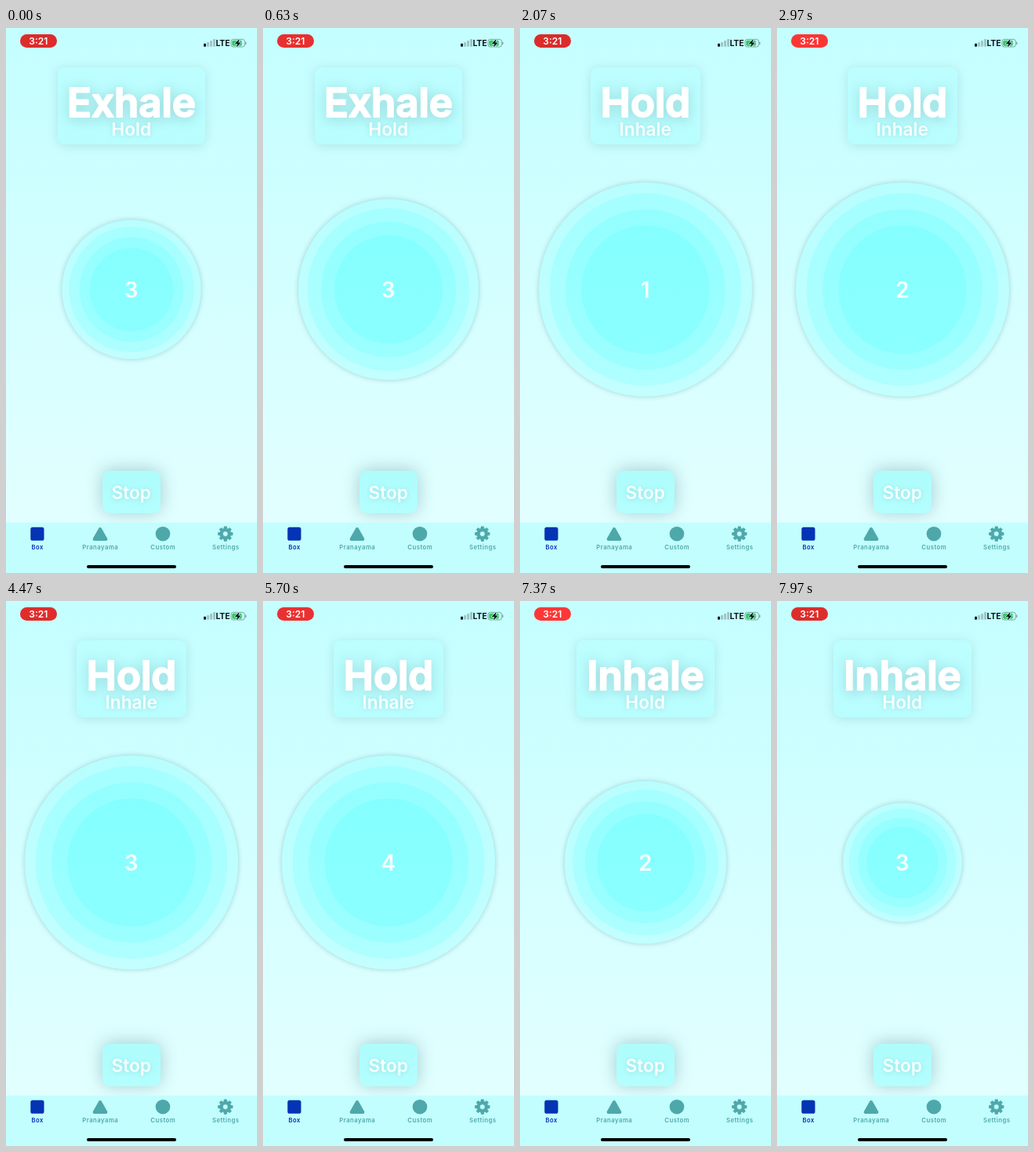
Recreate the animation shown at these times as an HTML page with a canvas. Size 320 by 693 pixels, loop 8 s.

```html
<!DOCTYPE html>
<html lang="en">
<head>
<meta charset="utf-8">
<title>Box breathing</title>
<style>
  html, body { margin: 0; width: 100%; height: 100%; overflow: hidden; background: #d2feff; }
  canvas { display: block; width: 100vw; height: 100vh; }
</style>
</head>
<body>
<canvas id="stage"></canvas>
<script>
const W = 320, H = 693, LOOP = 8000, PHASE = 4000;
const LABEL_START = 1950;   // first phase change of the labels
const MOVE_START = 1850;    // the disc starts slightly ahead of them
const R_MIN = 27, R_MAX = 136;
const TEAL = '#4ea8aa', BLUE = '#0433b4', TAU = Math.PI * 2;

const PHASES = [
  { title: 'Exhale', next: 'Hold', half: 94 },
  { title: 'Hold', next: 'Inhale', half: 70 },
  { title: 'Inhale', next: 'Hold', half: 88 }
];

const canvas = document.getElementById('stage');
const ctx = canvas.getContext('2d');
let scale = 1;

function resize() {
  const dpr = window.devicePixelRatio || 1;
  canvas.width = Math.round(innerWidth * dpr);
  canvas.height = Math.round(innerHeight * dpr);
  scale = canvas.width / W;
}

function shadow(color, blur, dy = 0) {
  ctx.shadowColor = color;
  ctx.shadowBlur = blur * scale;
  ctx.shadowOffsetY = dy * scale;
}

function noShadow() {
  shadow('transparent', 0);
}

function roundRect(x, y, w, h, r, fill) {
  ctx.beginPath();
  ctx.roundRect(x, y, w, h, r);
  ctx.fillStyle = fill;
  ctx.fill();
}

function disc(x, y, r, fill) {
  ctx.beginPath();
  ctx.arc(x, y, r, 0, TAU);
  ctx.fillStyle = fill;
  ctx.fill();
}

function text(str, x, y, size, weight, fill, spacing = 0) {
  ctx.font = `${weight} ${size}px Inter, Roboto, sans-serif`;
  ctx.letterSpacing = spacing + 'px';
  ctx.textAlign = 'center';
  ctx.fillStyle = fill;
  ctx.fillText(str, x + spacing / 2, y);
  ctx.letterSpacing = '0px';
}

function vertical(y0, y1, from, to) {
  const g = ctx.createLinearGradient(0, y0, 0, y1);
  g.addColorStop(0, from);
  g.addColorStop(1, to);
  return g;
}

// Cubic ease-in-out with control points (.42, 0) and (.58, 1)
function ease(u) {
  if (u <= 0) return 0;
  if (u >= 1) return 1;
  let lo = 0, hi = 1, s = .5;
  for (let i = 0; i < 24; i++) {
    s = (lo + hi) / 2;
    const q = 1 - s;
    const x = 1.26 * q * q * s + 1.74 * q * s * s + s * s * s;
    if (x < u) lo = s; else hi = s;
  }
  return s * s * (3 - 2 * s);
}

function radiusAt(t) {
  const grow = ease((t - MOVE_START + PHASE) / PHASE);
  const shrink = ease((t - MOVE_START - PHASE) / PHASE);
  return R_MIN + (R_MAX - R_MIN) * (grow - shrink);
}

function drawStatus(t) {
  const pulse = (1 - Math.cos(TAU * (t - 200) / 2000)) / 2;
  const mix = (a, b) => Math.round(a + (b - a) * pulse);
  roundRect(18, 8, 47, 17, 8.5, `rgb(${mix(216, 255)},${mix(43, 56)},${mix(42, 54)})`);
  text('3:21', 41.3, 20.7, 12, 600, '#fff');

  for (let i = 0; i < 4; i++) {
    const h = 4 + i * 1.9;
    roundRect(252 + i * 4, 23.8 - h, 3, h, .8, i ? '#9fc5c8' : '#061a1c');
  }
  text('LTE', 276.5, 23.4, 10.4, 700, '#08191b');

  ctx.lineWidth = .9;
  ctx.strokeStyle = '#75999b';
  ctx.beginPath();
  ctx.roundRect(286.9, 14.4, 17.4, 9.6, 2.8);
  ctx.stroke();
  roundRect(288.2, 15.7, 12.6, 7, 1.7, '#39c75c');
  roundRect(305.2, 17.5, 1.1, 3.4, .5, '#75999b');
  ctx.beginPath();
  [[297.6, 13.8], [291.6, 19.9], [295, 19.9], [293.7, 24.7], [299.6, 18.4], [296.3, 18.4]]
    .forEach(([x, y]) => ctx.lineTo(x, y));
  ctx.closePath();
  ctx.lineJoin = 'round';
  ctx.strokeStyle = '#c8feff';
  ctx.lineWidth = 1.3;
  ctx.stroke();
  ctx.fillStyle = '#06191b';
  ctx.fill();
}

function drawCard({ title, next, half }) {
  shadow('rgba(0,70,80,.14)', 14, 2);
  roundRect(160 - half, 50, half * 2, 98, 9, vertical(50, 148, '#bdfeff', '#b9feff'));

  // A round outline softens the corners of the heavy title
  shadow('rgba(0,40,50,.36)', 15, 2);
  ctx.lineWidth = 2;
  ctx.lineJoin = 'round';
  ctx.strokeStyle = '#fff';
  ctx.font = '600 51px Inter, Roboto, sans-serif';
  ctx.textAlign = 'center';
  ctx.strokeText(title, 160, 112.7);
  noShadow();
  text(title, 160, 112.7, 51, 600, '#fff');

  shadow('rgba(0,60,70,.14)', 6, 1);
  text(next, 159.7, 137.2, 22.7, 600, '#f4ffff');
  noShadow();
}

function drawDisc(r, count) {
  const x = 160, y = 332.5;
  ctx.save();
  ctx.beginPath();
  ctx.rect(0, 0, W, H);
  ctx.arc(x, y, r, 0, TAU);
  ctx.clip('evenodd');
  shadow('rgba(0,50,60,.24)', 6);
  disc(x, y, r, '#bdfeff');
  ctx.restore();

  for (const k of [1, .9, .75, .6]) disc(x, y, r * k, 'rgba(0,255,255,.106)');
  text(count, 159.7, 343, 28, 600, '#f6ffff');
}

function drawStop() {
  shadow('rgba(0,70,80,.28)', 22, -1);
  roundRect(123, 563, 74, 54, 9, vertical(563, 617, '#aefcfc', '#b4fefe'));
  shadow('rgba(0,60,70,.14)', 6, 1);
  text('Stop', 159.7, 598.7, 22.7, 600, '#f4ffff');
  noShadow();
}

function drawGear(x, y) {
  ctx.beginPath();
  const teeth = 8, step = TAU / teeth;
  for (let i = 0; i < teeth; i++) {
    const a = i * step - Math.PI / 2;
    [[-.34, 7], [-.21, 9.4], [.21, 9.4], [.34, 7]].forEach(([k, r]) =>
      ctx.lineTo(x + r * Math.cos(a + k * step), y + r * Math.sin(a + k * step)));
  }
  ctx.closePath();
  ctx.moveTo(x + 3.4, y);
  ctx.arc(x, y, 3.4, 0, TAU);
  ctx.fillStyle = TEAL;
  ctx.fill('evenodd');
  ctx.lineWidth = .8;
  ctx.lineJoin = 'round';
  ctx.strokeStyle = TEAL;
  ctx.stroke();
}

function drawTabs() {
  ctx.fillStyle = '#c3feff';
  ctx.fillRect(0, 628.7, W, H - 628.7);

  roundRect(31.3, 634.8, 17.2, 17, 2.6, BLUE);

  ctx.beginPath();
  ctx.moveTo(120, 637);
  ctx.lineTo(127.4, 650);
  ctx.lineTo(112.6, 650);
  ctx.closePath();
  ctx.lineJoin = 'round';
  ctx.lineWidth = 4;
  ctx.strokeStyle = ctx.fillStyle = TEAL;
  ctx.stroke();
  ctx.fill();

  disc(200, 643.2, 9.3, TEAL);
  drawGear(279.7, 643.2);

  ['Box', 'Pranayama', 'Custom', 'Settings'].forEach((name, i) =>
    text(name, 40 + i * 80, 663.2, 7.7, 600, i ? TEAL : BLUE, .5));

  roundRect(103, 683, 114, 4, 2, '#000');
}

function draw(t) {
  ctx.setTransform(scale, 0, 0, canvas.height / H, 0, 0);
  noShadow();
  ctx.fillStyle = vertical(0, 629, '#c4feff', '#e2ffff');
  ctx.fillRect(0, 0, W, H);

  const elapsed = t - LABEL_START + PHASE;
  const phase = PHASES[Math.floor(elapsed / PHASE)];
  const count = 1 + Math.floor(elapsed % PHASE / 1000);

  drawCard(phase);
  drawDisc(radiusAt(t), String(count));
  drawStop();
  drawTabs();
  drawStatus(t);
}

const start = performance.now();

function tick() {
  draw((performance.now() - start) % LOOP);
  requestAnimationFrame(tick);
}

addEventListener('resize', resize);
resize();
tick();
</script>
</body>
</html>
```
